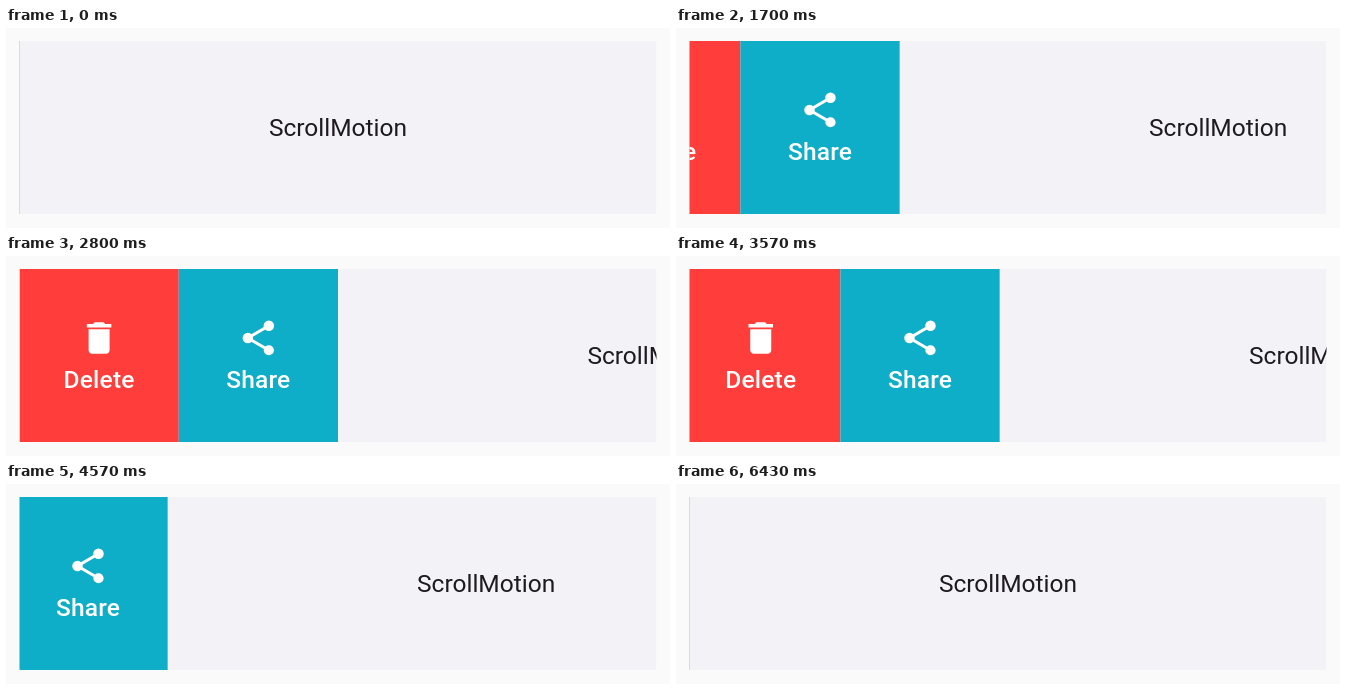
Write an HTML page that moves like this. It is 664 by 200 pixels and loops after 6.63 s.

```html
<!DOCTYPE html>
<html lang="en">
<head>
<meta charset="utf-8">
<style>
  html, body { margin: 0; width: 100%; height: 100%; overflow: hidden; background: #fafafa; }
  svg { display: block; }
  text { font: 24.5px Roboto, sans-serif; text-anchor: middle; }
  .action { fill: #fff; }
  .action text { font-weight: 500; letter-spacing: .18px; }
</style>
</head>
<body>
<svg width="664" height="200">
  <!-- The tile clips everything that slides inside it -->
  <svg x="13.5" y="13" width="637" height="173">
    <rect width="637" height="173" fill="#f3f2f7"/>
    <g id="slider">
      <g class="action" transform="translate(-318.5)">
        <rect width="159.25" height="173" fill="#ff3d3a"/>
        <path transform="translate(58.6 48) scale(1.75)" d="M6 19c0 1.1.9 2 2 2h8c1.1 0 2-.9 2-2V7H6zM19 4h-3.5l-1-1h-5l-1 1H5v2h14z"/>
        <text x="79.6" y="119.4">Delete</text>
      </g>
      <g class="action" transform="translate(-159.25)">
        <rect width="159.25" height="173" fill="#0eaec8"/>
        <g transform="translate(58.6 48) scale(1.75)">
          <path d="M18 5L6 12l12 7" fill="none" stroke="#fff" stroke-width="1.75"/>
          <circle cx="18" cy="5" r="3"/>
          <circle cx="6" cy="12" r="3"/>
          <circle cx="18" cy="19" r="2.92"/>
        </g>
        <text x="79.6" y="119.4">Share</text>
      </g>
      <text x="318.5" y="95" fill="#1d1b20">ScrollMotion</text>
    </g>
  </svg>
</svg>
<script>
  const LOOP = 6630;
  const slider = document.getElementById('slider');

  // [time in ms, offset in px]: nearly steady slide open, hold, slide shut
  const keys = [
    [0, 0], [380, 0], [1130, 119.3], [2230, 294.3], [2385, 318.5],
    [3515, 318.5], [3570, 310.3], [4170, 212.3], [5030, 74.7], [5500, 0], [LOOP, 0]
  ];

  function offsetAt(t) {
    const i = keys.findIndex(key => key[0] > t);
    const [t0, x0] = keys[i - 1], [t1, x1] = keys[i];
    return x0 + (x1 - x0) * (t - t0) / (t1 - t0);
  }

  function draw() {
    const x = offsetAt(performance.now() % LOOP);
    slider.setAttribute('transform', `translate(${x.toFixed(2)})`);
    requestAnimationFrame(draw);
  }
  draw();
</script>
</body>
</html>
```
